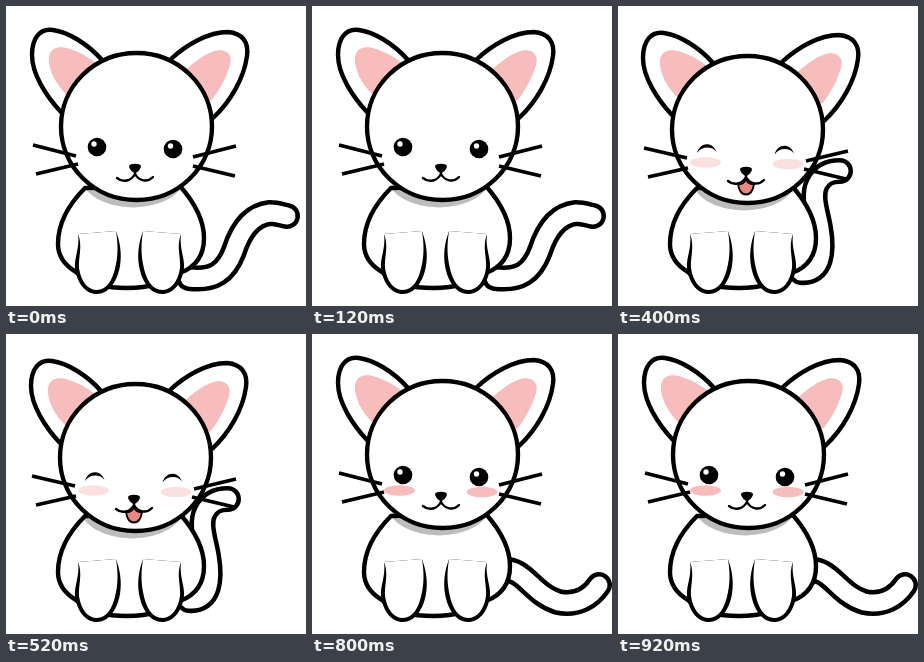
Write an HTML page that moves like this. It is 300x300 px and loops after 1000 ms.

```html
<!DOCTYPE html>
<html lang="en">
<head>
<meta charset="utf-8">
<title>Happy kitten</title>
<style>
  html, body { margin: 0; width: 100%; height: 100%; overflow: hidden; background: #fff; }
  svg { display: block; width: 100vw; height: 100vh; }
  .line { fill: none; stroke: #000; stroke-width: 4.4; stroke-linecap: round; stroke-linejoin: round; }
  .white { fill: #fff; }
  .pink { fill: #f6bdbc; }
  .solid { fill: #fff; }
  .thin { stroke-width: 2.4; }
  .hair { stroke-width: 3.8; stroke-linecap: butt; }
  .edge { fill: none; stroke: #000; stroke-width: 26; stroke-linecap: round; }
  .fur { fill: none; stroke: #fff; stroke-width: 17; stroke-linecap: round; }

  .calm, .happy, .tail, .blush, .head { animation: 1s step-end infinite; }
  .calm { animation-name: calm; }
  .happy { animation-name: happy; visibility: hidden; }
  .head { animation-name: nod; }
  .blush { animation-name: blush; opacity: 0; }
  .tail { visibility: hidden; }
  .out { animation-name: out; }
  .up { animation-name: up; }
  .curl { animation-name: curl; }
  .low { animation-name: low; }

  @keyframes calm { 0%, 80%, 100% { visibility: visible } 20% { visibility: hidden } }
  @keyframes happy { 0%, 80%, 100% { visibility: hidden } 20% { visibility: visible } }
  @keyframes nod { 0%, 80%, 100% { transform: none } 20% { transform: translate(-1px, 3px) } }
  @keyframes blush { 0%, 20%, 100% { opacity: 0 } 40% { opacity: .45 } 60% { opacity: .86 } 80% { opacity: 1 } }
  @keyframes out { 0% { visibility: visible } 20%, 100% { visibility: hidden } }
  @keyframes up { 0%, 40%, 80%, 100% { visibility: hidden } 20%, 60% { visibility: visible } }
  @keyframes curl { 0%, 60%, 100% { visibility: hidden } 40% { visibility: visible } }
  @keyframes low { 0%, 100% { visibility: hidden } 80% { visibility: visible } }
</style>
</head>
<body>
<svg viewBox="0 0 300 300">
  <defs>
    <path id="out" d="M183 272C208 275 220 266 228 245C235 223 246 209 264 207C271 207 276 209 281 210"/>
    <path id="up" d="M182 268C205 269 219 256 220 234C219 208 226 188 246 184C251 183 256 183 260 184"/>
    <path id="curl" d="M183 266C204 268 206 245 202 222C199 205 193 190 199 178C204 168 212 165 222 165"/>
    <path id="low" d="M190 236C212 233 220 260 246 268C265 272 279 263 287 251"/>
    <path id="torso" d="M79 182C64 197 52 217 52 238C52 252 60 260 70 266C80 279 104 282 121 282C140 282 160 278 174 267C190 261 198 250 198 232C198 214 188 196 174 180Z"/>
    <clipPath id="inTorso"><use href="#torso"/></clipPath>
    <g id="leg">
      <path d="M72 228C74 242 68 252 69 262C71 278 80 288 91 288C102 288 111 277 114 260C116 247 114 236 110 225Z"/>
      <path class="white" d="M72 228C77 240 72 252 73 262C75 276 82 284 91 284C100 284 107 275 110 258C112 248 112 238 110 225Z"/>
    </g>
    <path id="lid" d="M79 147C82 135.500 95 135.500 98.500 146C94 140 84 140 79 147Z"/>
  </defs>

  <g class="tail out"><use href="#out" class="edge"/><use href="#out" class="fur"/></g>
  <g class="tail up"><use href="#up" class="edge"/><use href="#up" class="fur"/></g>
  <g class="tail curl"><use href="#curl" class="edge"/><use href="#curl" class="fur"/></g>
  <g class="tail low"><use href="#low" class="edge"/><use href="#low" class="fur"/></g>

  <use href="#torso" class="white"/>
  <g clip-path="url(#inTorso)">
    <ellipse class="head" cx="127" cy="170" rx="52" ry="31.500" fill="#bdbdbd"/>
  </g>
  <use href="#torso" class="line"/>
  <use href="#leg"/>
  <use href="#leg" transform="translate(247 0) scale(-1 1)"/>

  <g class="head">
    <path class="line solid" d="M55 106C40 90 26 68 26 49C26 32 34 22 47 24C62 26 82 38 96 54"/>
    <path class="pink" d="M63 91C49 78 42 63 43 51C45 40 55 40 64 43C77 47 87 54 94 61Z"/>
    <path class="line solid" d="M165 53C180 39 202 26 222 26C236 27 243 36 241 50C238 72 225 95 207 112"/>
    <path class="pink" d="M176 68C187 56 202 45 214 44C224 45 227 52 223 62C219 75 212 86 205 95Z"/>
    <ellipse class="line solid" cx="130.500" cy="120.500" rx="75.500" ry="73.500"/>
    <path d="M123 160C124 157 134 157 135 160C135 163 131 167 129 167C127 167 123 163 123 160Z"/>
    <path class="line thin" d="M129 165V168M111 172C117 177 125 175 129 168C133 175 141 177 147 171"/>
  </g>

  <g class="blush pink">
    <ellipse cx="87.500" cy="156.500" rx="15.500" ry="5.200"/>
    <ellipse cx="170" cy="158" rx="15.500" ry="5.200"/>
  </g>

  <g class="calm">
    <circle cx="91" cy="141" r="9.300"/>
    <circle cx="167" cy="143" r="9.300"/>
    <circle class="white" cx="88" cy="138" r="2.700"/>
    <circle class="white" cx="164.500" cy="140" r="2.700"/>
    <path class="line hair" d="M27 139L70 150M30 168L72 158M187 151L230 140M187 160L229 170"/>
  </g>

  <g class="happy">
    <use href="#lid"/>
    <use href="#lid" transform="translate(77.500 1.500)"/>
    <path d="M120 178C121 185 124 188.500 128 188.500C132 188.500 135 185 136 178C132 179 129 176 128 173C127 176 124 179 120 178Z" fill="#ea8786" stroke="#000" stroke-width="1.800" stroke-linejoin="round"/>
    <path class="line hair" d="M26 142L69 152M30 171L70 162M188 155L230 145M186 163L228 173"/>
  </g>
</svg>
</body>
</html>
```
